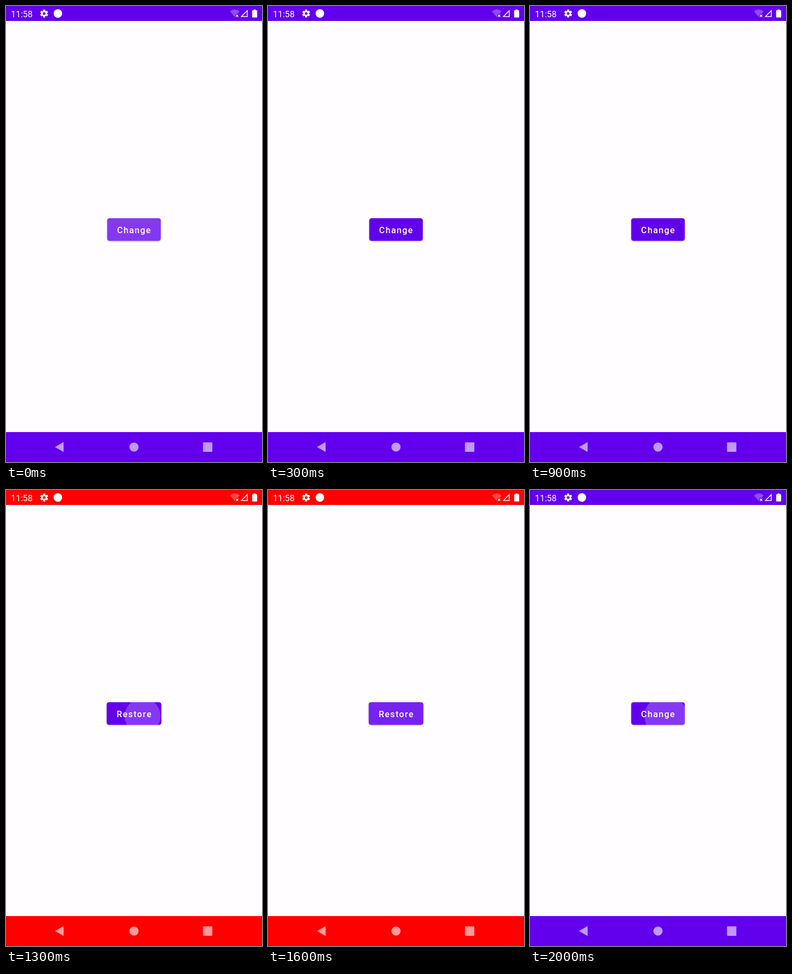
Write an HTML page that moves like this. It is 480x853 px and loops after 2100 ms.

```html
<!DOCTYPE html>
<html lang="en">
<head>
<meta charset="utf-8">
<title>Bar colours</title>
<style>
  html, body { margin: 0; height: 100%; overflow: hidden; background: #fffdff; }
  svg { display: block; width: 480px; height: 853px; }
  text { font: 16.33px Roboto, sans-serif; fill: #fff; }
  #label { font-weight: 500; letter-spacing: 1.46px; }
  #button { fill: #6200ee; filter: drop-shadow(0 1.5px 1.2px rgba(0, 0, 0, .28)); }
</style>
</head>
<body>
<svg viewBox="0 0 480 853">
  <defs>
    <clipPath id="clip"><rect id="mask" y="397" height="42.3" rx="4.5"/></clipPath>
  </defs>

  <path id="bars" d="M0 0H480V28H0zM0 797H480V853H0z"/>

  <!-- status bar -->
  <text x="9.3" y="20.5">11:58</text>
  <g fill="none" stroke="#fff">
    <circle cx="71.5" cy="14" r="4.1" stroke-width="3"/>
    <circle cx="71.5" cy="14" r="6.2" stroke-width="2.6" pathLength="12"
            stroke-dasharray="1.2 .8" stroke-dashoffset="-.4"/>
    <path d="M452.4 8.8V19.7H441.5z" stroke-width="1.6"/>
    <path d="M431.2 16.2L435.4 20.4M435.4 16.2L431.2 20.4" stroke-width="1.4"/>
  </g>
  <g fill="#fff">
    <circle cx="97.3" cy="14" r="8"/>
    <path d="M420 10Q429 3.2 438 10L434 14.8H430V19.6L429 20.8z" opacity=".3"/>
    <path d="M464.2 6.5H468.2V8H470.2Q471 8 471 8.8V20.6Q471 21.5 470.2 21.5H462.3Q461.5 21.5 461.5 20.6V8.8Q461.5 8 462.3 8H464.2z"/>
  </g>

  <!-- navigation bar -->
  <g fill="#fff" opacity=".6">
    <path d="M92.6 825L107.6 816.4V833.6z" stroke="#fff" stroke-linejoin="round"/>
    <circle cx="240" cy="825" r="8.6"/>
    <rect x="369.3" y="816.3" width="17.6" height="17.6" rx="1.2"/>
  </g>

  <rect id="button" y="397" height="42.3" rx="4.5"/>
  <g clip-path="url(#clip)"><circle id="ripple" fill="#fff"/></g>
  <text id="label" y="425"></text>
</svg>

<script>
const LOOP = 2100, STEP = 100;
const taps = [
  { start: 1255, dx: 18, dy: 5.5 },
  { start: 1910, dx: 22.4, dy: 8 }
];
const $ = id => document.getElementById(id);
const clamp = v => Math.min(1, Math.max(0, v));
const set = (el, attrs) => {
  for (const k in attrs) el.setAttribute(k, attrs[k]);
};

function drawRipple(t) {
  const tap = t >= taps[0].start && t < taps[1].start ? taps[0] : taps[1];
  const age = (t - tap.start + LOOP) % LOOP;
  const u = clamp(age / 225);
  const grow = u * u * (3 - 2 * u);
  set($("ripple"), {
    cx: 240 + tap.dx * (1 - grow),
    cy: 418 + tap.dy * (1 - grow),
    r: 31 + 25 * grow,
    opacity: 0.22 * clamp((460 - age) / 192)
  });
}

function draw(now) {
  const t = Math.floor(now % LOOP / STEP) * STEP;
  const red = t >= 1300 && t < 2000;
  const box = red ? { x: 188.8, width: 102.4 } : { x: 189.8, width: 100.4 };
  set($("bars"), { fill: red ? "#f00" : "#6200ee" });
  set($("button"), box);
  set($("mask"), box);
  set($("label"), { x: red ? 207.4 : 208.3 });
  $("label").textContent = red ? "Restore" : "Change";
  drawRipple(t);
}

let begin;
function tick(now) {
  begin ??= now;
  draw(now - begin);
  requestAnimationFrame(tick);
}
draw(0);
requestAnimationFrame(tick);
</script>
</body>
</html>
```
